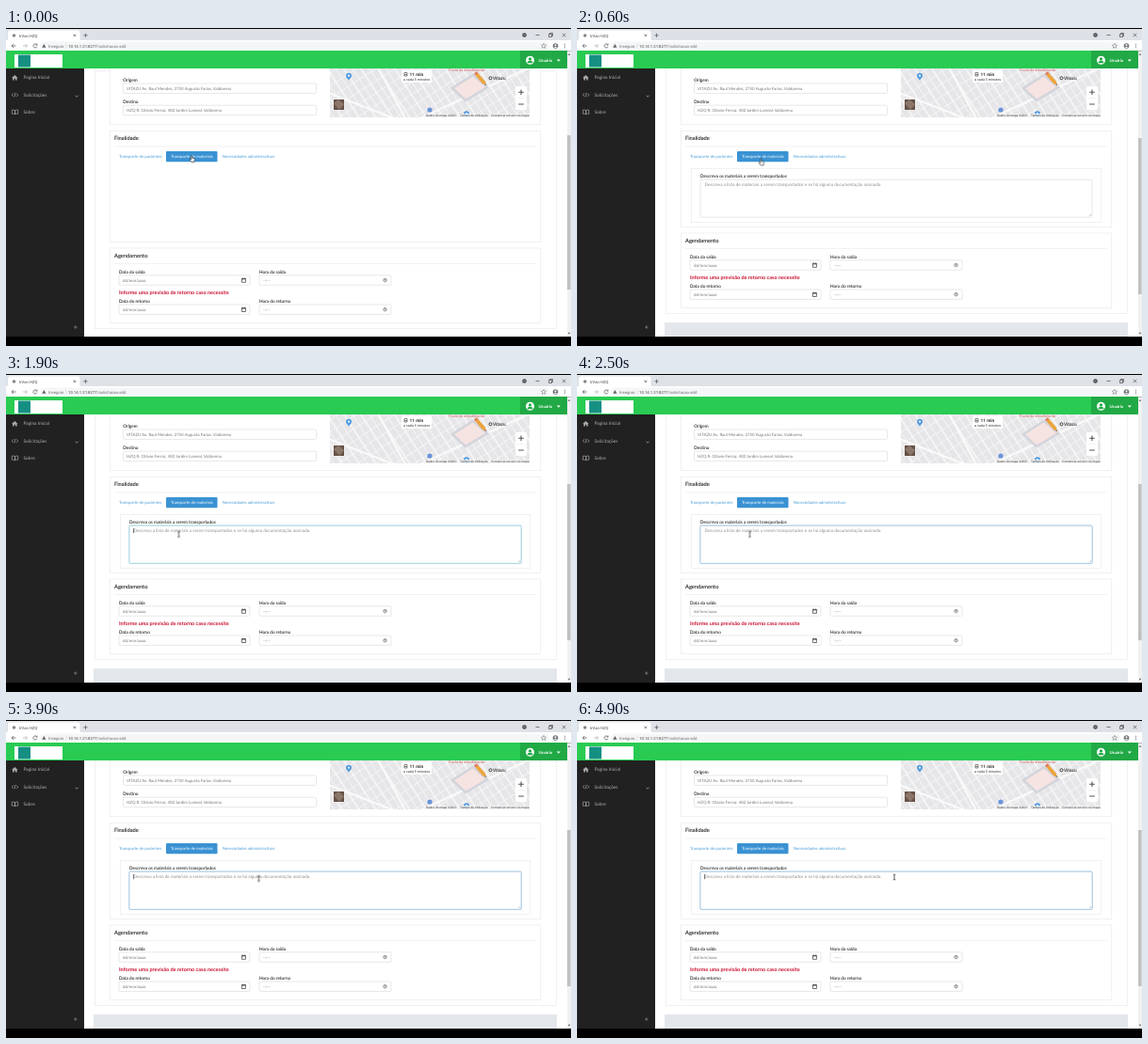
Recreate the animation shown at these times as an HTML page. Size 600x338 px, loop 5000 ms.

```html
<!DOCTYPE html>
<html lang="pt">
<head>
<meta charset="utf-8">
<title>IrVan HZQ</title>
<style>
html, body { margin: 0; width: 100%; height: 100%; overflow: hidden; background: #000; }
svg { display: block; width: 100vw; height: 100vh; }
text { font-family: Lato, "Open Sans", sans-serif; text-rendering: geometricPrecision; white-space: pre; }
.ui { font-family: Roboto, "Open Sans", sans-serif; font-size: 4.25px; fill: #6b6f74; }
.map { font-family: Roboto, Arial, sans-serif; font-size: 3.2px; fill: #333; }
.side { font-size: 4.85px; fill: #b0b0b0; }
.head { font-size: 5.75px; fill: #222; stroke: #222; stroke-width: .08px; }
.label { font-size: 4.7px; fill: #222; stroke: #222; stroke-width: .06px; }
.value { font-size: 4.4px; fill: #777; }
.tab { font-size: 4.35px; fill: #4a9cd6; }
.warn { font-size: 5.5px; font-weight: 700; fill: #c8102e; }
.hint { font-size: 4.69px; fill: #8d8d8d; }
.card { fill: #fff; stroke: #eaeaea; stroke-width: .7px; }
.field { fill: #fff; stroke: #dedede; stroke-width: .7px; }
.rule { stroke: #eaeaea; stroke-width: .6px; }
.line { fill: none; stroke: #5f6368; stroke-width: .8px; }

.early, .late, .lower, .panel, .ring, .caret, .cursor, .hand, .beam { animation: 5s infinite step-end; }
.early { animation-name: early; }
.late { animation-name: late; }
.lower { animation-name: lower; }
.panel { animation-name: panel; }
.ring { animation-name: ring; fill: none; stroke-width: 1px; }
.caret { animation-name: caret; }
.cursor { animation-name: cursor; }
.hand { animation-name: hand; }
.beam { animation-name: beam; }

@keyframes early { 0% { opacity: 1 } 2%, 100% { opacity: 0 } }
@keyframes late { 0% { opacity: 0 } 2%, 100% { opacity: 1 } }
@keyframes lower { 0% { transform: translateY(16px) } 2%, 100% { transform: none } }
@keyframes panel { 0% { opacity: 0 } 2% { opacity: .5 } 4% { opacity: .85 } 6%, 100% { opacity: 1 } }
@keyframes ring {
  0% { opacity: 0; stroke: #a6d8e4 }
  34% { opacity: .6; stroke: #a6d8e4 }
  36% { opacity: 1; stroke: #a6d8e4 }
  42%, 100% { opacity: 1; stroke: #a5cbea }
}
@keyframes caret {
  0%, 44%, 64%, 84% { opacity: 0 }
  34%, 54%, 74%, 94%, 100% { opacity: 1 }
}
@keyframes hand { 0% { opacity: 1 } 14%, 100% { opacity: 0 } }
@keyframes beam { 0% { opacity: 0 } 14%, 100% { opacity: 1 } }
@keyframes cursor {
  0% { transform: translate(197.5px, 139px) }
  10% { transform: translate(197.5px, 139px); animation-timing-function: steps(6) }
  22% { transform: translate(186px, 159.5px); animation-timing-function: steps(2) }
  26% { transform: translate(183.5px, 170.5px) }
  52% { transform: translate(183.5px, 170.5px); animation-timing-function: steps(5) }
  62% { transform: translate(196.5px, 168.5px); animation-timing-function: steps(5) }
  72% { transform: translate(245px, 168.5px); animation-timing-function: steps(3) }
  78% { transform: translate(268.5px, 168.5px); animation-timing-function: steps(3) }
  84% { transform: translate(298px, 168px); animation-timing-function: steps(6) }
  96%, 100% { transform: translate(337px, 167px) }
}
</style>
</head>
<body>
<svg viewBox="0 0 600 338">
  <defs>
    <pattern id="streets" width="15" height="11" patternUnits="userSpaceOnUse" patternTransform="translate(350 44) rotate(-33)">
      <rect width="15" height="11" fill="#e6e6e9"/>
      <path d="M0 0H15M0 0V11M8 0V11" stroke="#f8f8f9" stroke-width="1.6"/>
    </pattern>
    <clipPath id="mapBox"><rect x="344" y="43" width="212" height="52"/></clipPath>
    <clipPath id="page"><rect x="83" y="43" width="512" height="285"/></clipPath>
    <g id="dates">
      <rect class="field" x="120" y="0" width="139" height="10.4" rx="1"/>
      <text class="value" x="124" y="6.8">dd/mm/aaaa</text>
      <path d="M250.4 3.5h4v4h-4zM250.4 4.1h4M251.2 2.8v.9M253.6 2.8v.9" fill="none" stroke="#333" stroke-width=".7"/>
      <rect class="field" x="269" y="0" width="140" height="10.4" rx="1"/>
      <text class="value" x="273" y="6.8">--:--</text>
      <circle cx="402.5" cy="5.2" r="1.7" fill="none" stroke="#444" stroke-width=".6"/>
      <path d="M402.5 4.1v1.2h.9" fill="none" stroke="#444" stroke-width=".5"/>
    </g>
    <g id="pin">
      <path d="M0 4.2C-1 2-3 1.2-3-.8a3 3 0 0 1 6 0C3 1.2 1 2 0 4.2z" fill="#4f9ae0"/>
      <circle cy="-.8" r="1.1" fill="#fff"/>
    </g>
  </defs>

  <rect width="600" height="338" fill="#000"/>

  <!-- browser -->
  <rect y="1" width="600" height="13" fill="#dee1e6"/>
  <path d="M0 13.5Q2 13.5 2 11V5Q2 2.5 4.5 2.5H76Q78.5 2.5 78.5 5V11Q78.5 13.5 80.5 13.5z" fill="#fff"/>
  <circle cx="8.5" cy="8" r="1.8" fill="#888"/>
  <text class="ui" x="14" y="9.5" style="fill:#444">IrVan HZQ</text>
  <path class="line" d="M71.6 6.6l2.4 2.4m0-2.4l-2.4 2.4M82.4 7.8h4.2M84.5 5.7v4.2"/>
  <circle cx="550.5" cy="7.5" r="2.3" fill="#4a4d52"/>
  <path d="M549.5 7l1 1 1-1" fill="none" stroke="#fff" stroke-width=".5"/>
  <path d="M562.5 7.5h4M576.5 6.5h3v3h-3zM577.5 6.5v-1h3v3h-1M590.8 5.8l3.4 3.4m0-3.4l-3.4 3.4" fill="none" stroke="#333" stroke-width=".6"/>
  <rect y="13" width="600" height="11.5" fill="#fff"/>
  <rect x="36" y="14.6" width="541" height="8.6" rx="4.3" fill="#f5f6f7"/>
  <path class="line" d="M10.5 19H6m2-2l-2 2 2 2"/>
  <path class="line" d="M18 19h4.5m-2-2l2 2-2 2" style="stroke:#b4b7bb"/>
  <path class="line" d="M32.6 17.7a2 2 0 1 0 .3 2M33 16.6v1.5h-1.5"/>
  <path d="M40.3 16.9l2.1 3.8h-4.2z" fill="#5f6368"/>
  <text class="ui" x="45" y="20.5">Inseguro</text>
  <path d="M63.9 16.8v4.6" stroke="#c4c7ca" stroke-width=".5"/>
  <text class="ui" x="66" y="20.5"><tspan fill="#444">10.14.1.21:8277</tspan>/solicitacao-add</text>
  <path class="line" d="M571 16.4l.8 1.7 1.8.2-1.3 1.2.4 1.8-1.7-.9-1.7.9.4-1.8-1.3-1.2 1.8-.2z" style="stroke-width:.5px"/>
  <circle cx="583.5" cy="19" r="2.8" fill="#70757a"/>
  <circle cx="583.5" cy="18.2" r="1" fill="#fff"/>
  <path d="M581.7 20.9q1.8-2 3.6 0z" fill="#fff"/>
  <path d="M593.5 16.8v.8m0 1v.8m0 1v.8" stroke="#5f6368"/>

  <!-- header -->
  <rect y="24" width="596" height="19" fill="#29cb52"/>
  <rect x="546" y="24" width="50" height="19" fill="#21a946"/>
  <rect x="9" y="28" width="51" height="14" fill="#fff"/>
  <rect x="13" y="28.5" width="13" height="13" fill="#168f83"/>
  <circle cx="556.5" cy="34.3" r="4.5" fill="#fff"/>
  <circle cx="556.5" cy="32.9" r="1.6" fill="#21a946"/>
  <path d="M553.5 37.3q0-2.5 3-2.5t3 2.5z" fill="#21a946"/>
  <text x="565.5" y="36" style="font-size:4.3px;font-weight:700;fill:#fff">Usuária</text>
  <path d="M584.8 33.4h4l-2 2.3z" fill="#fff"/>

  <!-- sidebar -->
  <rect y="43" width="83" height="285" fill="#212121"/>
  <path d="M6 53l3.3-3 3.3 3h-1v2.5H10v-1.8H8.600v1.8H7V53z" fill="#aaa"/>
  <text class="side" x="18.5" y="54.2">Pagina Inicial</text>
  <path d="M8 69.3L6.2 71.1 8 72.9M11 69.3l1.8 1.8-1.8 1.8M9.9 68.9l-.8 4.4" fill="none" stroke="#aaa" stroke-width=".7"/>
  <text class="side" x="18.5" y="72.8">Solicitações</text>
  <path d="M73.7 71.7l1.5 1.5 1.5-1.5" fill="none" stroke="#bbb" stroke-width=".7"/>
  <path d="M9.5 87.6q-1.6-.9-3.2-.4v4q1.6-.5 3.2.4zm0 0q1.6-.9 3.2-.4v4q-1.6-.5-3.2.4z" fill="none" stroke="#aaa" stroke-width=".7"/>
  <text class="side" x="18.5" y="91.2">Sobre</text>
  <path d="M72 318h3.6M73.8 316.2v3.6" stroke="#999" stroke-width=".6"/>

  <!-- page -->
  <rect x="83" y="43" width="517" height="285" fill="#fff"/>
  <g clip-path="url(#page)">
    <g class="lower">
      <rect x="93" y="313" width="492" height="30" fill="#e3e7eb"/>
      <rect class="card" x="94.3" y="30" width="490" height="273.5"/>
    </g>

    <rect class="card" x="110.3" y="30" width="457.5" height="72.5"/>
    <text class="label" x="124.3" y="56.6">Origem</text>
    <rect class="field" x="124.5" y="59" width="205" height="10.4" rx="1"/>
    <text class="value" x="128" y="65.9">VITAZU Av. Raul Mendes, 2750 Augusto Farias, Valdorena</text>
    <text class="label" x="124.3" y="79.7">Destino</text>
    <rect class="field" x="124.5" y="82.2" width="205" height="10.4" rx="1"/>
    <text class="value" x="128" y="89">HZQ R. Otávio Ferraz, 482 Jardim Lumeal, Valdorena</text>

    <g clip-path="url(#mapBox)">
      <rect x="344" y="43" width="212" height="52" fill="url(#streets)"/>
      <path d="M340 68L412 96M395 42L424 96M440 96L556 42" fill="none" stroke="#fafafa" stroke-width="2.2"/>
      <path d="M474 64L496 50 511 63 488 77z" fill="#f6e4e3" stroke="#d3d4db" stroke-width="2.6"/>
      <text class="map" x="470" y="46" style="font-size:3.9px;fill:#d76a6a">Posto de atendimento</text>
      <path d="M497 48.5l2.8-2.3 9.2 10.6.8 4-3.9-1.7z" fill="#eda33c"/>
      <path d="M497 48.5l2.8-2.3 1.5 1.7-2.8 2.3z" fill="#dc7d6e"/>
      <path d="M508.3 60l1.5.8-.3-1.6z" fill="#333"/>
      <circle cx="514.5" cy="53.3" r="1.5" fill="#fff" stroke="#222" stroke-width=".9"/>
      <text class="map" x="517" y="55.2" style="font-size:4.8px;font-weight:500">Vitazu</text>
      <rect x="420" y="44.5" width="32" height="13.5" rx="1" fill="#fff"/>
      <path d="M423 47.5h3v3.5h-3zM423 49.5h3" fill="none" stroke="#555" stroke-width=".7"/>
      <text class="map" x="428.5" y="51" style="font-size:4.8px;font-weight:700">11 min</text>
      <text class="map" x="422" y="56" style="font-size:3.7px">a cada 5 minutos</text>
      <use href="#pin" x="364" y="51.5"/>
      <use href="#pin" x="489" y="92"/>
      <rect x="347.5" y="75.5" width="12" height="12" fill="#665248" stroke="#fff" stroke-width=".8"/>
      <path d="M348 80l5-4 6 5-5 6z" fill="#8b7669"/>
      <rect x="541" y="62" width="12" height="25" rx="1" fill="#fff"/>
      <path d="M544.2 68.3h5.6M547 65.5v5.6M544.2 81h5.6" stroke="#555" stroke-width="1.1"/>
      <path d="M542.5 74.5h9" stroke="#e5e5e5" stroke-width=".5"/>
      <circle cx="450" cy="87" r="2.6" fill="#6794d8"/>
      <rect x="444" y="91" width="112" height="4" fill="#f5f5f5" opacity=".8"/>
      <text class="map" x="446" y="94.2">Dados do mapa ©2021</text>
      <text class="map" x="482" y="94.2">Termos de Utilização</text>
      <text class="map" x="515" y="94.2">Comunicar um erro no mapa</text>
    </g>

    <rect class="card early" x="110.3" y="109.3" width="457.5" height="118.2"/>
    <rect class="card late" x="110.3" y="109.3" width="457.5" height="102.2"/>
    <path class="rule" d="M115 126h448"/>
    <text class="head" x="115" y="119.2">Finalidade</text>
    <text class="tab" x="120" y="138.2">Transporte de pacientes</text>
    <rect x="170" y="131" width="54.5" height="11.2" rx="1" fill="#3a92d3"/>
    <text class="tab" x="175" y="138.2" style="fill:#fff">Transporte de materiais</text>
    <text class="tab" x="229.7" y="138.2">Necessidades administrativas</text>

    <g class="panel">
      <rect class="card" x="121.3" y="149.3" width="435.5" height="57"/>
      <text class="label" x="131" y="158.7">Descreva os materiais a serem transportados</text>
      <rect class="field" x="131" y="161.2" width="416" height="40" rx="1"/>
      <text class="hint" x="135.5" y="168.1">Descreva a lista de materiais a serem transportados e se há alguma documentação assinada.</text>
      <path d="M543.8 200l2.2-2.2M545.3 200l.7-.7" stroke="#888" stroke-width=".4"/>
    </g>
    <rect class="ring" x="130.8" y="161" width="416.5" height="40.4" rx="1.2"/>
    <path class="caret" d="M135.5 164v5.2" stroke="#222" stroke-width=".6"/>

    <g class="lower">
      <rect class="card" x="110.3" y="218" width="457.5" height="79.5"/>
      <path class="rule" d="M115 234.5h448"/>
      <text class="head" x="115" y="227.8">Agendamento</text>
      <text class="label" x="120" y="244.7">Data da saída</text>
      <text class="label" x="269" y="244.7">Hora da saída</text>
      <use href="#dates" y="246.8"/>
      <text class="warn" x="120" y="267.4">Informe uma previsão de retorno caso necessite</text>
      <text class="label" x="120" y="275.6">Data do retorno</text>
      <text class="label" x="269" y="275.6">Hora do retorno</text>
      <use href="#dates" y="278"/>
    </g>
  </g>

  <!-- scrollbar -->
  <rect x="596" y="24.500" width="4" height="303.500" fill="#f1f1f1"/>
  <rect class="early" x="596" y="114" width="3.6" height="164" fill="#c1c1c1"/>
  <rect class="late" x="596" y="117" width="3.6" height="166" fill="#c1c1c1"/>
  <path d="M596.7 28.7l1.3-1.6 1.3 1.6zM596.7 323.8l1.3 1.6 1.3-1.6z" fill="#555"/>

  <g class="cursor">
    <path class="hand" d="M-.9-3.2q.7-.7 1.2 0v2.3l2.3.7q.6.2.4 1L2.400 3.400H-.6L-2.500.9q0-.8.8-.5l.8.6z" fill="#fff" stroke="#111" stroke-width=".6"/>
    <path class="beam" d="M-1.2-2.9q1.2 0 1.2.6 0-.6 1.2-.6M0-2.3v4.6M-1.2 2.9q1.2 0 1.2-.6 0 .6 1.2.6" fill="none" stroke="#111" stroke-width=".7"/>
  </g>
</svg>
</body>
</html>
```
